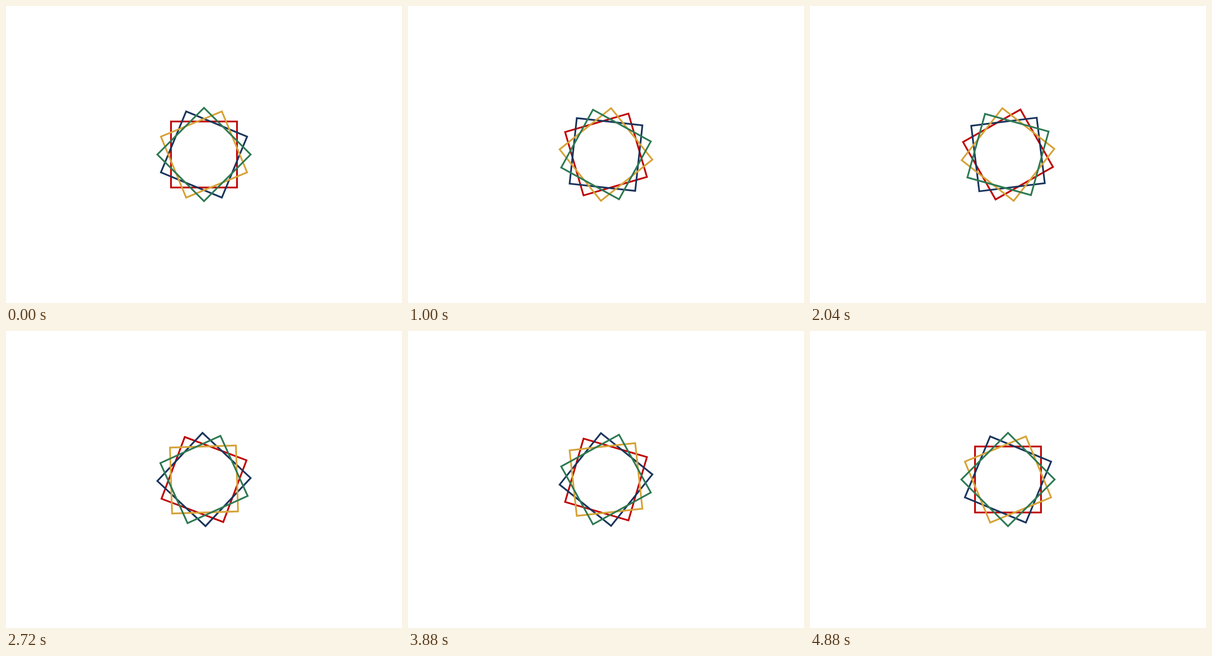
An HTML page that plays this animation: 864 by 648 pixels, repeating every 4920 ms.

```html
<!DOCTYPE html>
<html lang="en">
<head>
<meta charset="utf-8">
<title>Turning squares</title>
<style>
  html, body { margin: 0; width: 100%; height: 100%; overflow: hidden; background: #fff; }
  svg { display: block; width: 864px; height: 648px; }
  rect { fill: none; stroke-width: 3.75; stroke-linejoin: miter; }
</style>
</head>
<body>
<svg viewBox="0 0 864 648"></svg>
<script>
  const NS = "http://www.w3.org/2000/svg";
  const STEP = 40, STEPS = 122, SIDE = 144, CX = 432, CY = 324;
  const colors = ["#c00000", "#1b365d", "#d6a338", "#2f7a53"];
  const offsets = [0, 22.5, 67.5, 45];
  const svg = document.querySelector("svg");

  const squares = colors.map(color => {
    const rect = document.createElementNS(NS, "rect");
    const attrs = { x: -SIDE / 2, y: -SIDE / 2, width: SIDE, height: SIDE, stroke: color };
    for (const name in attrs) rect.setAttribute(name, attrs[name]);
    return svg.appendChild(rect);
  });

  // One full turn in 122 steps, plus one step of rest where the loop closes.
  function draw(ms) {
    const step = Math.floor((ms + 0.5) / STEP) % (STEPS + 1);
    const turn = 360 * step / STEPS;
    squares.forEach((rect, i) => {
      rect.setAttribute("transform", `translate(${CX} ${CY}) rotate(${turn + offsets[i]})`);
    });
  }

  let start;
  function tick(now) {
    if (start === undefined) start = now;
    draw(now - start);
    requestAnimationFrame(tick);
  }
  draw(0);
  requestAnimationFrame(tick);
</script>
</body>
</html>
```
